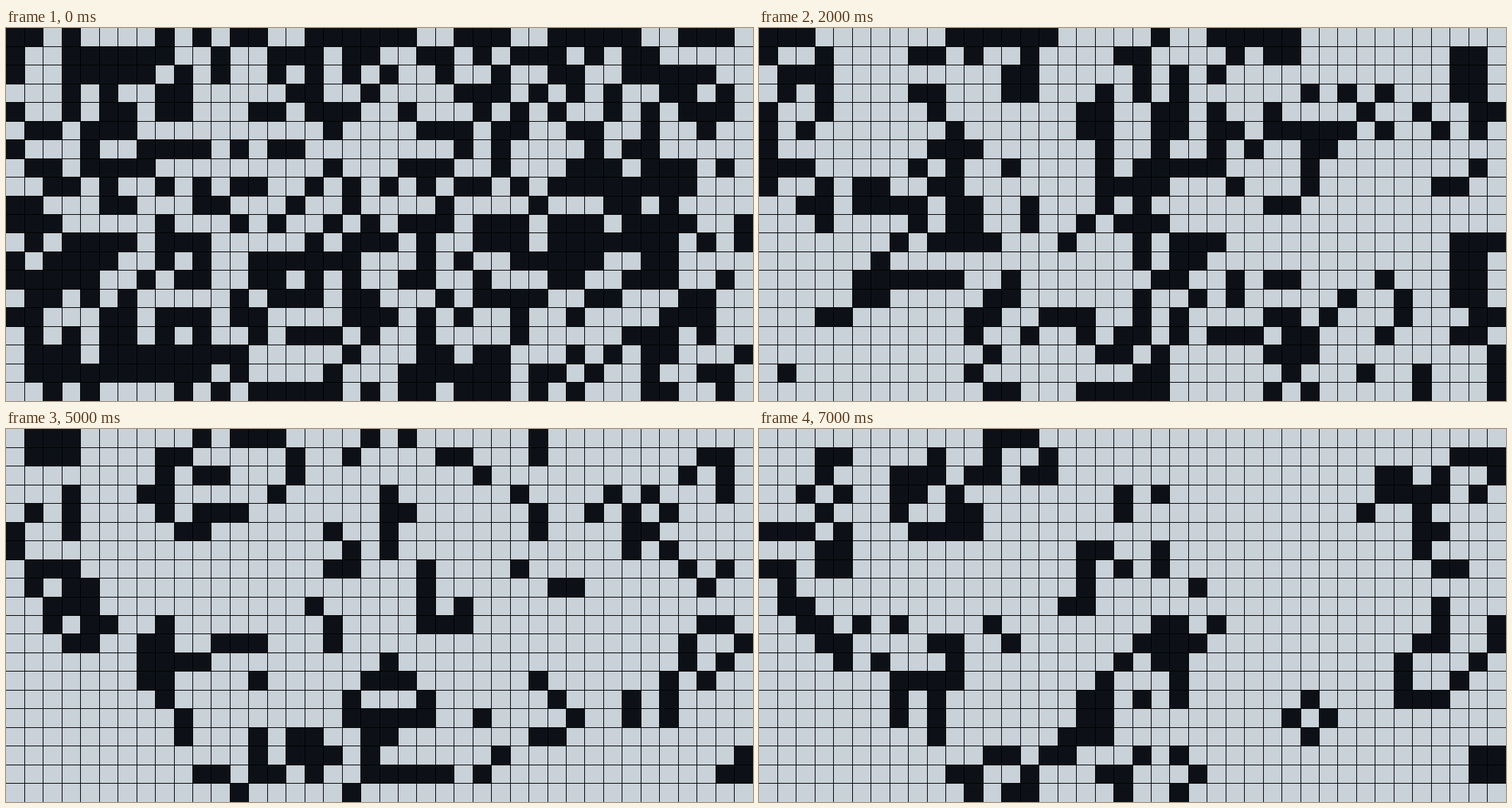
Animation, 1058 px wide and 529 px high, one loop 8 s. Source, as an HTML page with a canvas:

```html
<!DOCTYPE html>
<html lang="en">
<head>
<meta charset="utf-8">
<title>Game of Life</title>
<style>
  html, body { margin: 0; width: 100%; height: 100%; overflow: hidden; background: #c9d1d9; }
  canvas { display: block; }
</style>
</head>
<body>
<canvas id="board" width="1058" height="529"></canvas>
<script>
const COLS = 40, ROWS = 20, CELL = 26.45;
const STEP = 1000, STEPS = 8;
const LIGHT = '#c9d1d9', DARK = '#0d1117', LINE = '#000';

// Starting generation: # is a live cell
const seed = `
##.#....#.#.##..######..###..#####..###.
#..######..#..###.##..##.#.###.#.##.....
#..#####.#.#..#.#.#.#..#..#..##..#####..
...#.#..##.....##..#....###.#.#.#..##.#.
#..#.##.##...##.###..#...#.#.#..#.#.###.
.##.###..........#....###.##..##..#..#..
#...#..####.#.##........#.#....#.##.....
.##.####.........#...###..#...###.###.#.
..##.#..#.#.##..#.#.#.#.##.#.########...
##...##...##...#..#....#....#...##.#....
###.....#...#.#..#.#.###.###.###.####..#
.#.####.###.....#.###.#..###.#######.#.#
#.####..#.#..######...#.#..#####..##....
#####..#.##..##.#.#..##..#...##..###..#.
.##.#.#.....#.###.##...#.####..##...##..
##...##.###.##....###.#.#..#..#....###..
.#.#.##.#.#..#.###.#..#....#.....###.#..
.###.########.....#...##.##...#.#.##...#
.##########.#....#...######.##.#..#..##.
..#.#....#.#.#####.#.##.###.#.#...##..#.
`.trim().split('\n').map(row => [...row].map(c => c === '#'));

// Cells beyond the edges count as dead
function liveAround(grid, y, x) {
  let n = 0;
  for (let dy = -1; dy <= 1; dy++)
    for (let dx = -1; dx <= 1; dx++)
      if ((dy || dx) && grid[y + dy]?.[x + dx]) n++;
  return n;
}

const evolve = grid => grid.map((row, y) => row.map((alive, x) => {
  const n = liveAround(grid, y, x);
  return n === 3 || (alive && n === 2);
}));

const generations = [seed];
while (generations.length < STEPS) generations.push(evolve(generations.at(-1)));

const ctx = document.getElementById('board').getContext('2d');
const edge = i => Math.floor(i * CELL);

function draw(grid) {
  ctx.fillStyle = LIGHT;
  ctx.fillRect(0, 0, 1058, 529);
  ctx.fillStyle = DARK;
  grid.forEach((row, y) => row.forEach((alive, x) => {
    if (alive) ctx.fillRect(edge(x), edge(y), edge(x + 1) - edge(x), edge(y + 1) - edge(y));
  }));
  ctx.fillStyle = LINE;
  for (let x = 1; x < COLS; x++) ctx.fillRect(edge(x), 0, 1, 529);
  for (let y = 1; y < ROWS; y++) ctx.fillRect(0, edge(y), 1058, 1);
}

let shown = -1;
function tick() {
  const step = Math.floor(performance.now() / STEP) % STEPS;
  if (step !== shown) draw(generations[shown = step]);
  requestAnimationFrame(tick);
}
tick();
</script>
</body>
</html>
```
